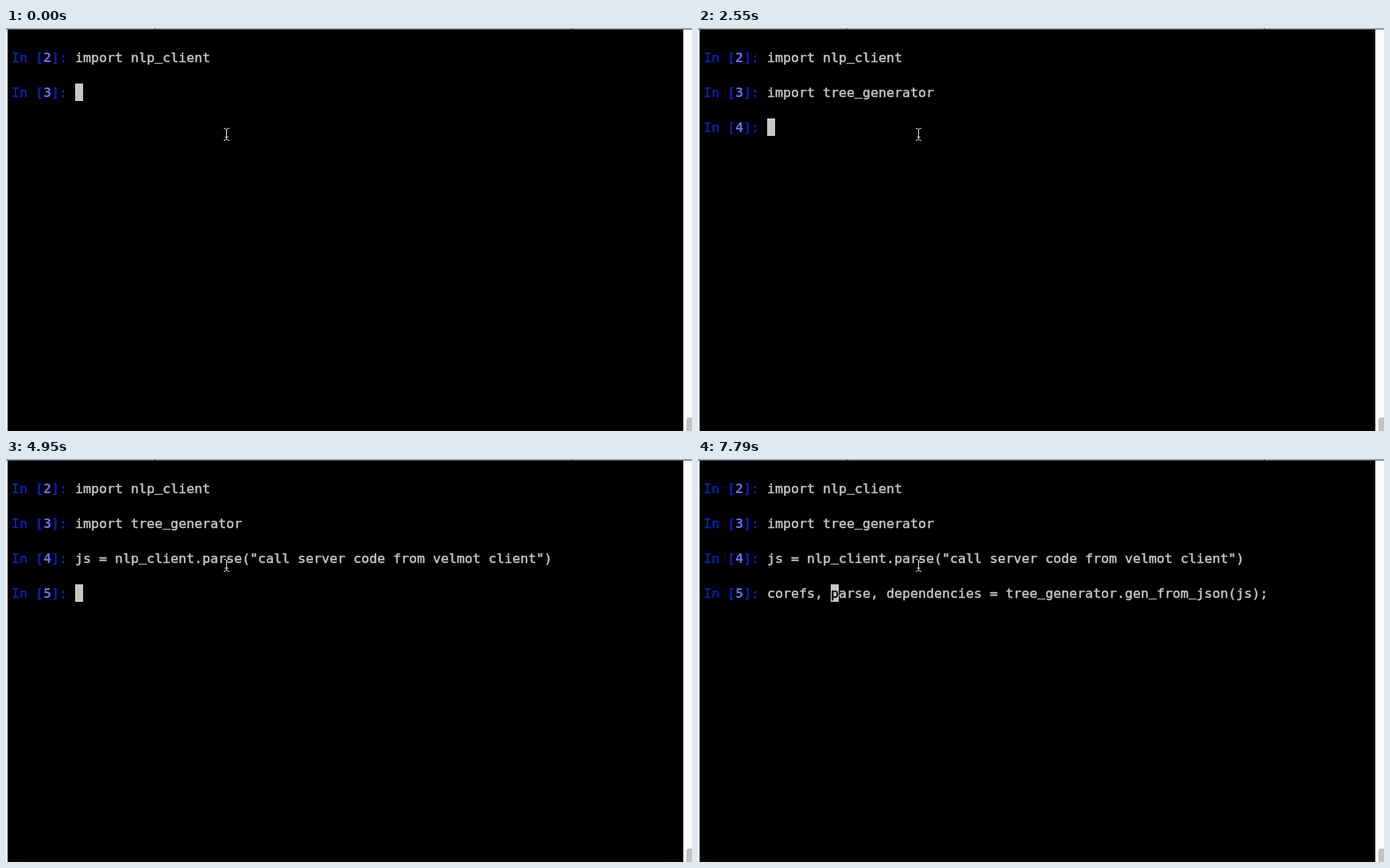
Animation, 863 px wide and 508 px high, one loop 8 s. Source, as an HTML page:

```html
<!DOCTYPE html>
<html lang="en">
<head>
<meta charset="utf-8">
<title>Interactive shell session</title>
<style>
  html, body { margin: 0; width: 100%; height: 100%; overflow: hidden; background: #000; }
  svg { display: block; }
  text { font: 16.61px "DejaVu Sans Mono", monospace; white-space: pre; fill: #c7c7c7; stroke: #c7c7c7; stroke-width: .45px; }
  .prompt { fill: #0225c7; stroke: #0225c7; }
  .number { fill: #6871ff; stroke: none; font-weight: bold; }
  .low { baseline-shift: 2px; }
  #under { fill: #000; stroke: #000; }
</style>
</head>
<body>
<svg width="863" height="508" viewBox="0 0 863 508">
  <rect width="863" height="508"/>
  <rect y="505" width="852" height="3" fill="#080003"/>
  <rect width="1" height="508" fill="#fff"/>
  <rect x="1" width="1" height="508" fill="#eee"/>
  <rect width="863" height="1" fill="#b8b8b8"/>
  <rect y="1" width="863" height="1" fill="#6a6a6a"/>
  <path d="M187.5 0v2M712.5 0v2" stroke="#444"/>
  <rect x="852" y="2" width="11" height="506" fill="#fafafa"/>
  <rect x="852" y="2" width="1" height="506" fill="#e8e8e8"/>
  <rect x="856" y="491" width="10" height="24" rx="4" fill="#c1c1c1"/>
  <g id="lines"></g>
  <rect id="cursor" width="10" height="22" fill="#c7c7c7"/>
  <text id="under"></text>
  <path d="M274 126.5h1.5q2 .5 2 2.5v10q0 2-2 2.5h-1.5M281 126.5h-1.5q-2 .5-2 2.5M281 141.5h-1.5q-2-.5-2-2.5M275.500 137.500h4"
        fill="none" stroke="#e0e0e0"/>
</svg>
<script>
const LOOP = 8000, LEFT = 7, CODE = 87, CELL = 10, TOP = 26, PITCH = 44, BASE = 17;
const call = 'js = nlp_client.parse("call server code from velmot client")';
const result = 'corefs, parse, dependencies = tree_generator.gen_from_json(js);';

// Each step: start time, line of the cursor, its text, cursor column.
const steps = [[0, 1, '', 0]];
function type(line, text, stops) {
  for (const [time, length] of stops) steps.push([time, line, text.slice(0, length), length]);
}
type(1, 'import ', [[450, 1], [600, 2], [750, 3], [900, 6], [1050, 7]]);
steps.push(
  [1500, 1, 'import nlp_client', 7],
  [1800, 1, 'import tree_generator', 7],
  [2250, 1.5, '', -8],
  [2550, 2, '', 0]);
type(2, call, [[3600, 1], [3750, 3], [3900, 4], [4050, 5]]);
steps.push([4350, 2, call, 5], [4950, 3, '', 0]);
type(3, result, [[6450, 2], [6600, 3], [6900, 4], [7050, 5], [7190, 7], [7340, 8]]);
steps.push([7790, 3, result, 8]);

const done = ['import nlp_client', 'import tree_generator', call, result];
const cursor = document.getElementById('cursor');
const under = document.getElementById('under');

function place(el, x, y) {
  el.setAttribute('x', x);
  el.setAttribute('y', y);
}

function addText(parent, x, y) {
  const el = document.createElementNS('http://www.w3.org/2000/svg', 'text');
  place(el, x, y);
  return parent.appendChild(el);
}

const span = (name, text) => `<tspan class="${name}">${text}</tspan>`;

const rows = done.map((_, i) => {
  const group = document.createElementNS('http://www.w3.org/2000/svg', 'g');
  const y = TOP + PITCH * i + BASE;
  document.getElementById('lines').append(group);
  addText(group, LEFT, y).innerHTML =
    span('prompt', 'In [') + span('number', i + 2) + span('prompt', ']:');
  return { group, code: addText(group, CODE, y) };
});

let shown;
function draw(now) {
  const time = now % LOOP;
  const step = steps.findLast(s => s[0] <= time);
  if (step !== shown) {
    shown = step;
    const [, line, text, column] = step;
    rows.forEach(({ group, code }, i) => {
      group.style.display = i <= line ? '' : 'none';
      code.innerHTML = (i < line ? done[i] : text).replaceAll('_', span('low', '_'));
    });
    const x = CODE + CELL * column, y = TOP + PITCH * line;
    place(cursor, x, y);
    place(under, x, y + BASE);
    under.textContent = text[column] || '';
  }
  requestAnimationFrame(draw);
}
draw(performance.now());
</script>
</body>
</html>
```
